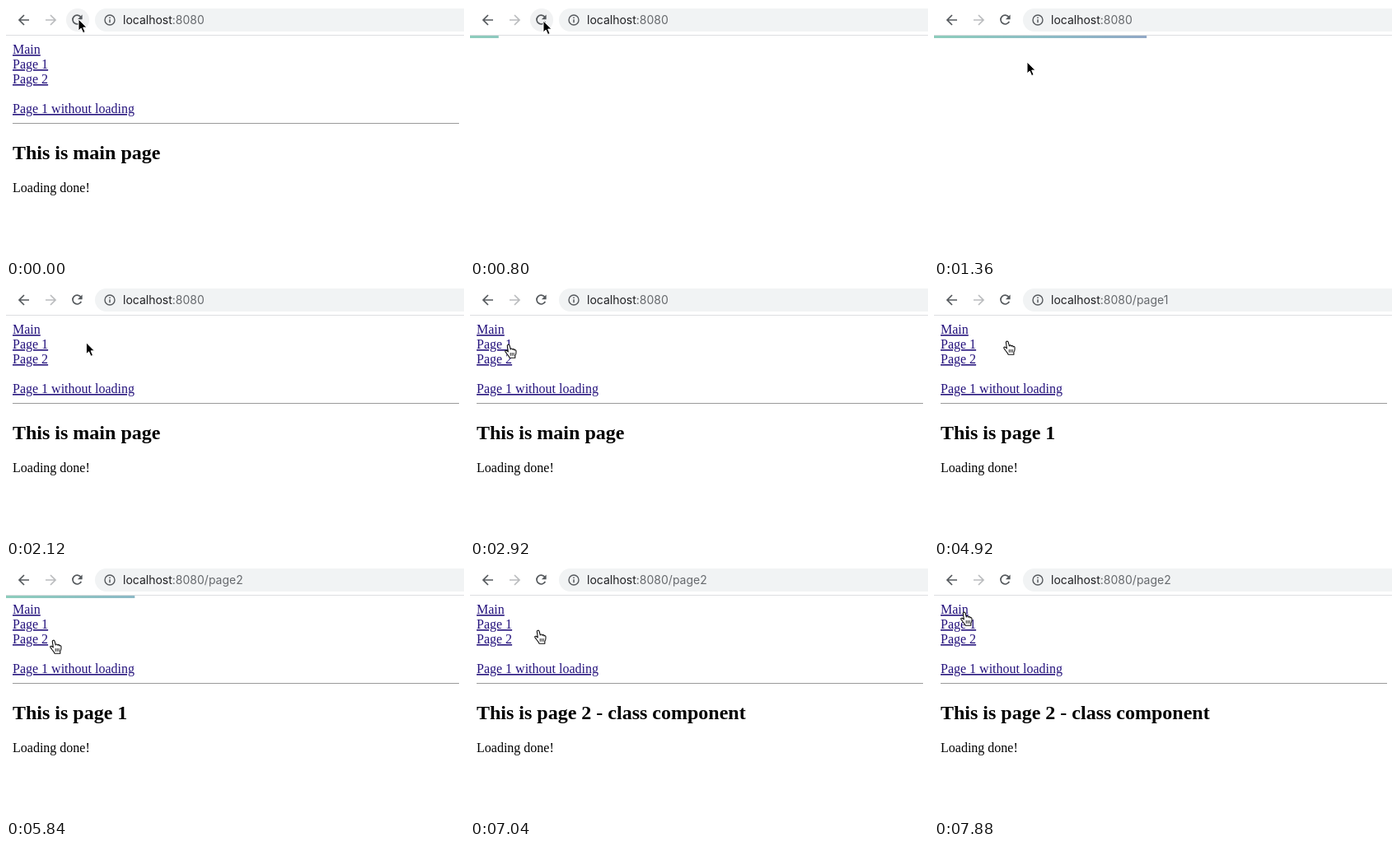
These frames come from a looping animation (556 px wide and 306 px high, 8 s). An HTML page:

```html
<!DOCTYPE html>
<html lang="en">
<head>
<meta charset="utf-8">
<title>Page loading bar</title>
<style>
  html, body { margin: 0; width: 100%; height: 100%; overflow: hidden; background: #fff; }
  svg { display: block; width: 556px; height: 306px; }
  .page { font: 16px "Liberation Serif", "Times New Roman", serif; }
  .link { fill: #25137d; text-decoration: underline; }
  .title { font-size: 24px; font-weight: bold; }
  .url { font: 14px Inter, sans-serif; fill: #202124; }
  .path { fill: #66696d; }
  .icon { fill: none; stroke: #55595d; stroke-width: 1.7; }
</style>
</head>
<body>
<svg viewBox="0 0 556 306">
  <defs>
    <linearGradient id="tint" gradientUnits="userSpaceOnUse" x1="0" x2="556">
      <stop offset="0" stop-color="#8dcdbc"/>
      <stop offset=".28" stop-color="#8cb9c6"/>
      <stop offset=".48" stop-color="#91a6c6"/>
      <stop offset="1" stop-color="#9895c4"/>
    </linearGradient>
  </defs>

  <g class="page" id="page">
    <text class="link" x="8" y="58">Main</text>
    <text class="link" x="8" y="76">Page 1</text>
    <text class="link" x="8" y="94">Page 2</text>
    <text class="link" x="8" y="130">Page 1 without loading</text>
    <path d="M8 142.5H550" stroke="#9a9a9a"/>
    <text class="title" id="title" x="8" y="186"></text>
    <text x="8" y="226">Loading done!</text>
  </g>

  <path d="M0 35.5H556" stroke="#dcdee0"/>
  <circle id="hover" cx="87" cy="17" r="14" fill="#f1f2f3"/>
  <path d="M556 3H122a14 14 0 0 0 0 28H556Z" fill="#f1f3f4"/>
  <path class="icon" d="M28 17H16.5M22 11l-6 6 6 6"/>
  <path class="icon" d="M48 17H59.5M54 11l6 6-6 6" style="stroke:#babcbe"/>
  <path class="icon" d="M90.6 13.2A5.4 5.4 0 1 0 91.3 18.8"/>
  <path d="M92.6 10.5V16.2H86.9Z" fill="#55595d"/>
  <circle class="icon" cx="126" cy="17" r="6" style="stroke-width:1.4"/>
  <path class="icon" d="M126 16.2V20.3M126 13.4V15" style="stroke-width:1.5"/>
  <text class="url" x="142" y="22">localhost<tspan class="path" id="path"></tspan></text>

  <rect id="bar" y="36" height="3" fill="url(#tint)"/>

  <path id="arrow" d="M0 0V14L3.2 11.1 5.6 16.6 8.1 15.5 5.7 10.1H10Z" stroke="#fff" stroke-width="1" stroke-linejoin="round"/>
  <g id="hand" fill="#fff" stroke="#111" stroke-width="1.1" stroke-linejoin="round" stroke-linecap="round">
    <path d="M-1.7 1.6C-1.9-.1.7-.4 1.1 1.3L2.3 6C2.6 4.5 4.6 4.6 4.8 6.2 5.3 5.2 6.9 5.5 7 6.9 7.6 6.2 9 6.6 9 8.1 9.2 10.4 8.9 12 7.8 13.6V16.3H1.1C.5 14.2-1 13.1-2.3 11.3-3 10-4.9 8.6-4.3 7.7-3.5 6.7-2 7.4-.7 8.9Z"/>
    <path d="M2.2 10.4V13.4M4.2 10.4V13.4M6.2 10.4V13.4" stroke-width=".9"/>
  </g>
</svg>
<script>
const LOOP = 8000, WIDTH = 556, LOAD = 1000, FILL = 200, FADE = 160;
const $ = id => document.getElementById(id);
const clamp = v => Math.min(1, Math.max(0, v));
const smooth = u => u * u * (3 - 2 * u);
const linear = u => u;

const loads = [
  { start: 740, path: ":8080", title: "This is main page" },
  { start: 3080, path: ":8080/page1", title: "This is page 1" },
  { start: 5580, path: ":8080/page2", title: "This is page 2 - class component" }
];
// [ms since start, bar width]
const growth = [[0, 0], [100, 57], [260, 156], [440, 214], [620, 258], [760, 282], [LOAD, 311]];
// [ms, x, y]
const pointer = [
  [0, 88, 16], [840, 89, 18], [1320, 113, 68], [1900, 113, 68], [2600, 47, 71],
  [3200, 47, 71], [3760, 100, 62], [4740, 100, 62], [5360, 47, 86],
  [5620, 47, 86], [5840, 58, 90], [6400, 83, 78], [7260, 83, 78], [7840, 37, 56]
];
const BLANK_FROM = 560, HAND_FROM = 2460;

function sample(keys, t, ease) {
  const i = keys.findIndex(k => k[0] > t);
  if (i < 0) return keys[keys.length - 1].slice(1);
  const a = keys[i - 1], b = keys[i];
  const u = ease((t - a[0]) / (b[0] - a[0]));
  return a.slice(1).map((v, n) => v + (b[n + 1] - v) * u);
}

function drawBar(age) {
  let [width] = sample(growth, Math.max(0, age), linear);
  if (age > LOAD) width += (WIDTH - width) * smooth(clamp((age - LOAD) / FILL));
  $("bar").setAttribute("width", width);
  $("bar").setAttribute("opacity", 1 - clamp((age - LOAD - FILL) / FADE));
}

function setText(id, text) {
  if ($(id).textContent !== text) $(id).textContent = text;
}

function draw(t) {
  const latest = time => loads.filter(l => l.start <= time).pop() || loads[0];
  const load = latest(t);
  setText("path", load.path);
  setText("title", latest(t - LOAD).title);
  $("page").style.display = t >= BLANK_FROM && t < loads[0].start + LOAD ? "none" : "";
  drawBar(t - load.start);

  const [x, y] = sample(pointer, t, smooth);
  $("hover").style.display = Math.hypot(x - 87, y - 17) < 14 ? "" : "none";
  const hand = t >= HAND_FROM;
  $("arrow").style.display = hand ? "none" : "";
  $("hand").style.display = hand ? "" : "none";
  $(hand ? "hand" : "arrow").setAttribute("transform", `translate(${x} ${y})`);
}

const begin = performance.now();
function tick() {
  draw((performance.now() - begin) % LOOP);
  requestAnimationFrame(tick);
}
tick();
</script>
</body>
</html>
```
